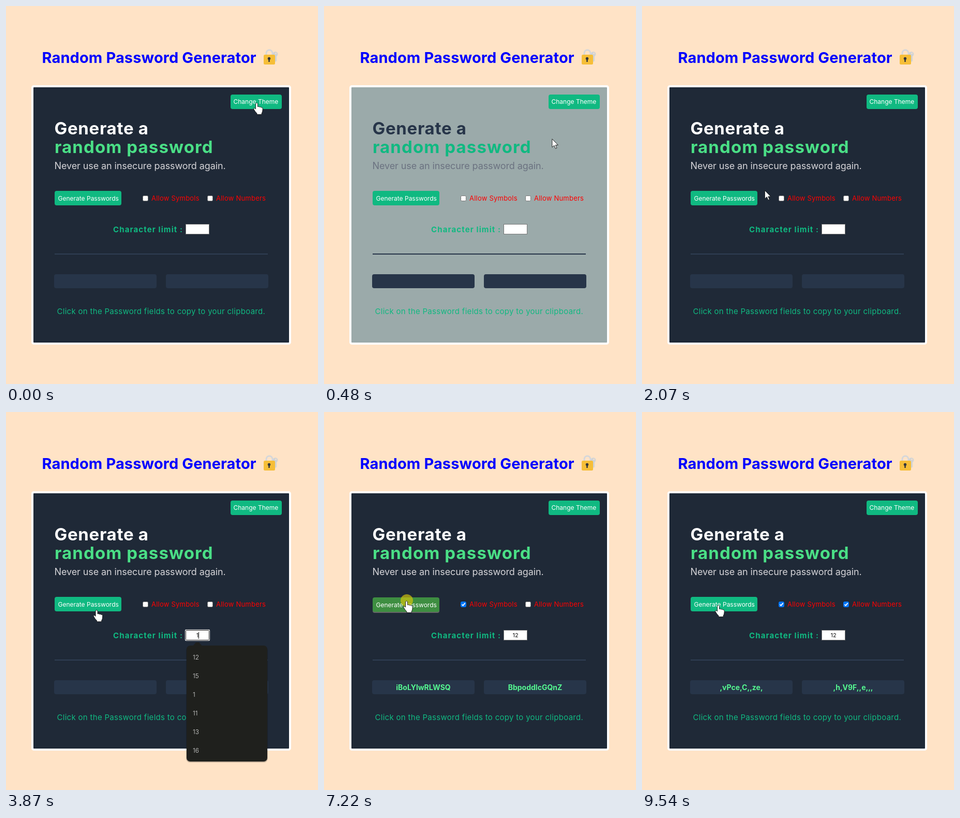
An HTML page for the animation above (9910 ms loop, 603 px wide and 730 px high).

```html
<!DOCTYPE html>
<html lang="en">
<head>
<meta charset="utf-8">
<title>Random Password Generator</title>
<style>
  html, body { margin: 0; width: 100%; height: 100%; overflow: hidden; background: #ffe3c6; }
  svg { display: block; width: 603px; height: 730px; font-family: Inter, Roboto, sans-serif; }
  svg { --panel: #1f2937; --head: #fff; --accent: #4adf86; --sub: #d5d4d8; --line: #2f3e53; --field: #273549; }
  svg.light { --panel: #9baaaa; --head: #273549; --accent: #10b981; --sub: #6b7280; --line: #273549; }
  .green { fill: #10b981; }
  .btn text { fill: #fff; font-size: 12px; }
  .btn rect { fill: #10b981; }
  .btn.down { transform: translateY(1px); }
  .btn.down rect { fill: #3e8e41; }
  .btn .shade { display: none; }
  .btn.down .shade { display: block; fill: #666; }
  .label { fill: #f00; font-size: 13px; letter-spacing: .22px; }
  .box rect { fill: #fff; stroke: #767676; }
  .box path { display: none; fill: none; stroke: #fff; stroke-width: 1.8; }
  .box.on rect { fill: #0075ff; stroke: #0075ff; }
  .box.on path { display: block; }
  .field { fill: var(--field); }
  .pass { fill: #55f991; font-size: 14px; font-weight: 700; text-anchor: middle; }
  #items text { fill: #ddd; font-size: 12px; font-weight: 300; }
  #cursor path { fill: #fff; stroke: #111; stroke-width: .9; stroke-linejoin: round; }
</style>
</head>
<body>
<svg id="stage" viewBox="0 0 603 730">
  <text x="69.500" y="110" font-size="29" font-weight="700" letter-spacing=".1" fill="#00f">Random Password Generator</text>

  <g id="lock">
    <path d="M503 96V91a6 6 0 0 1 12 0v5" fill="none" stroke="#d5d7da" stroke-width="3"/>
    <circle cx="520.5" cy="93" r="4.8" fill="#d0d3d6"/>
    <path d="M519 96h4v10l-2 2-2-2z" fill="#d0d3d6"/>
    <circle cx="521.5" cy="91.5" r="1.2" fill="#ffe3c6"/>
    <rect x="498" y="94" width="22" height="19" rx="2.5" fill="#f6be38"/>
    <circle cx="508.5" cy="101.5" r="2.7" fill="#34373b"/>
    <path d="M507.2 102h2.6v6h-2.6z" fill="#34373b"/>
  </g>

  <rect x="49" y="153" width="502" height="501" rx="5" fill="#fff"/>
  <rect x="53" y="157" width="494" height="493" rx="1" fill="var(--panel)"/>

  <g class="btn" id="theme">
    <rect class="shade" x="434" y="173" width="99" height="28" rx="4"/>
    <rect x="434" y="171" width="99" height="28" rx="4"/>
    <text x="439.500" y="189">Change Theme</text>
  </g>

  <g font-size="33" font-weight="700">
    <text x="93.500" y="248" letter-spacing=".7" fill="var(--head)">Generate a</text>
    <text x="94" y="284" letter-spacing="1.1" fill="var(--accent)">random password</text>
  </g>
  <text x="93.500" y="315" font-size="18" letter-spacing="-.1" fill="var(--sub)">Never use an insecure password again.</text>

  <g class="btn" id="make">
    <rect class="shade" x="94" y="359" width="129" height="28" rx="4"/>
    <rect x="94" y="357" width="129" height="28" rx="4"/>
    <text x="100.500" y="376">Generate Passwords</text>
  </g>

  <g class="box" id="symbols" transform="translate(264 366)">
    <rect x=".5" y=".5" width="10" height="10" rx="2"/>
    <path d="M2.500 5.700 4.600 7.800 8.700 2.900"/>
  </g>
  <text class="label" x="281" y="376">Allow Symbols</text>
  <g class="box" id="numbers" transform="translate(389 366)">
    <rect x=".5" y=".5" width="10" height="10" rx="2"/>
    <path d="M2.500 5.700 4.600 7.800 8.700 2.900"/>
  </g>
  <text class="label" x="406" y="376">Allow Numbers</text>

  <text class="green" x="207" y="437" font-size="15" font-weight="700" letter-spacing="1.1">Character limit :</text>
  <rect x="347.500" y="421.500" width="45" height="19" fill="#fff" stroke="#767676"/>
  <g id="focus" fill="#fff">
    <rect x="346" y="420" width="48" height="22" rx="2"/>
    <rect x="347.500" y="421.500" width="45" height="19" rx="1" stroke="#111"/>
  </g>
  <text id="limit" x="370" y="435" font-size="11" text-anchor="middle" fill="#111"></text>
  <rect id="caret" y="425" width="1" height="13" fill="#111"/>

  <rect x="94" y="478" width="412" height="2" fill="var(--line)"/>
  <rect class="field" x="93" y="518" width="198" height="27" rx="4"/>
  <rect class="field" x="309" y="518" width="198" height="27" rx="4"/>
  <text class="pass" id="left" x="192" y="537"></text>
  <text class="pass" id="right" x="408" y="537"></text>
  <text class="green" x="98.500" y="595" font-size="15" letter-spacing=".3">Click on the Password fields to copy to your clipboard.</text>

  <g id="list">
    <rect x="348" y="453" width="158" height="224" rx="8" fill="#000" opacity=".2"/>
    <path d="M361 452 367 445h6l6 7z" fill="#1f201d"/>
    <rect x="349" y="451" width="156" height="224" rx="7" fill="#1f201d"/>
    <g id="items"></g>
  </g>

  <circle id="ring" r="12" fill="rgb(220,202,10)" opacity=".65"/>
  <g id="cursor"><path id="shape"/></g>
</svg>

<script>
const $ = id => document.getElementById(id);
const LOOP = 9910;

// Pointer path: time, x, y
const path = [
  [0, 485, 186], [30, 485, 186], [70, 484, 183], [300, 484, 183], [600, 418, 296],
  [800, 418, 296], [1200, 478, 187], [1350, 478, 187], [2160, 229, 362],
  [2290, 229, 362], [2850, 368, 424], [3350, 368, 428], [3900, 174, 381],
  [4250, 161, 371], [4860, 161, 371], [5110, 288, 421], [5350, 372, 423],
  [5820, 268, 386], [5920, 270, 374], [6510, 270, 374], [6790, 160, 364],
  [7450, 160, 364], [8130, 423, 364], [8480, 423, 364], [9080, 129, 371],
  [9240, 148, 372], [LOOP, 148, 372]
];

// Mouse presses: start, end, pressed button
const clicks = [
  [240, 330, 'theme'], [1260, 1340, 'theme'], [2880, 2960], [4460, 4560, 'make'],
  [6000, 6150], [7220, 7320, 'make'], [8250, 8400], [9270, 9420, 'make']
];

const passwords = [
  [0, '', ''],
  [4560, 'iBoLYlwRLWSQ', 'BbpoddlcGQnZ'],
  [7320, 'q,RwT,,mKe,Z', 'H,,bXo,Gd,nW'],
  [9420, ',vPce,C,,ze,', ',h,V9F,,e,,,']
];

const links = [[434, 171, 99, 28], [94, 357, 129, 28], [262, 362, 240, 20]];
const input = [347, 421, 46, 20];
const shapes = {
  arrow: 'M0 0V16L4 12.500 6.500 18.500 9 17.500 6.500 11.800H11.500Z',
  hand: 'M-2.500 2.500Q-.5-.5 1.500 2.500V8.500q2-1 3.400.6 2-.8 3.400.8 2-.4 2.800 1.200V14.500q0 4-2 7V23.500H0V21.500Q-3.500 18.500-6 13.500q-.8-2 .4-2.400 1.800 0 3.100 2Z',
  beam: 'M-2-7H2M0-7V7M-2 7H2'
};

['12', '15', '1', '11', '13', '16'].forEach((value, i) => {
  $('items').innerHTML += `<text x="361" y="${478 + 36 * i}">${value}</text>`;
});

const inside = (x, y, [l, t, w, h]) => x >= l && x < l + w && y >= t && y < t + h;
const show = (id, on) => { $(id).style.display = on ? '' : 'none'; };

function pointer(t) {
  const i = path.findIndex(key => key[0] > t);
  const [t0, x0, y0] = path[i - 1], [t1, x1, y1] = path[i];
  const u = (t - t0) / (t1 - t0), k = u * u * (3 - 2 * u);
  return [x0 + (x1 - x0) * k, y0 + (y1 - y0) * k];
}

function draw(t) {
  const [x, y] = pointer(t);
  const click = clicks.find(c => t >= c[0] && t < c[1]);
  const kind = links.some(r => inside(x, y, r)) ? 'hand' : inside(x, y, input) ? 'beam' : 'arrow';

  $('stage').classList.toggle('light', t >= 330 && t < 1340);
  for (const id of ['theme', 'make']) $(id).classList.toggle('down', !!click && click[2] === id);
  $('symbols').classList.toggle('on', t >= 6150);
  $('numbers').classList.toggle('on', t >= 8400);

  const focused = t >= 2960 && t < 4460;
  const value = t < 3300 ? '' : t < 4100 ? '1' : '12';
  show('focus', focused);
  show('list', t >= 2960 && t < 4200);
  show('caret', focused && t < 4290);
  $('caret').setAttribute('x', 370 + value.length * 2);
  $('limit').textContent = value;

  const [, left, right] = passwords.findLast(p => t >= p[0]);
  $('left').textContent = left;
  $('right').textContent = right;

  show('ring', click);
  $('ring').setAttribute('transform', `translate(${x} ${y})`);
  $('cursor').setAttribute('transform', `translate(${x} ${y})`);
  $('shape').setAttribute('d', shapes[kind]);
}

const start = performance.now();
function tick() {
  draw((performance.now() - start) % LOOP);
  requestAnimationFrame(tick);
}
tick();
</script>
</body>
</html>
```
